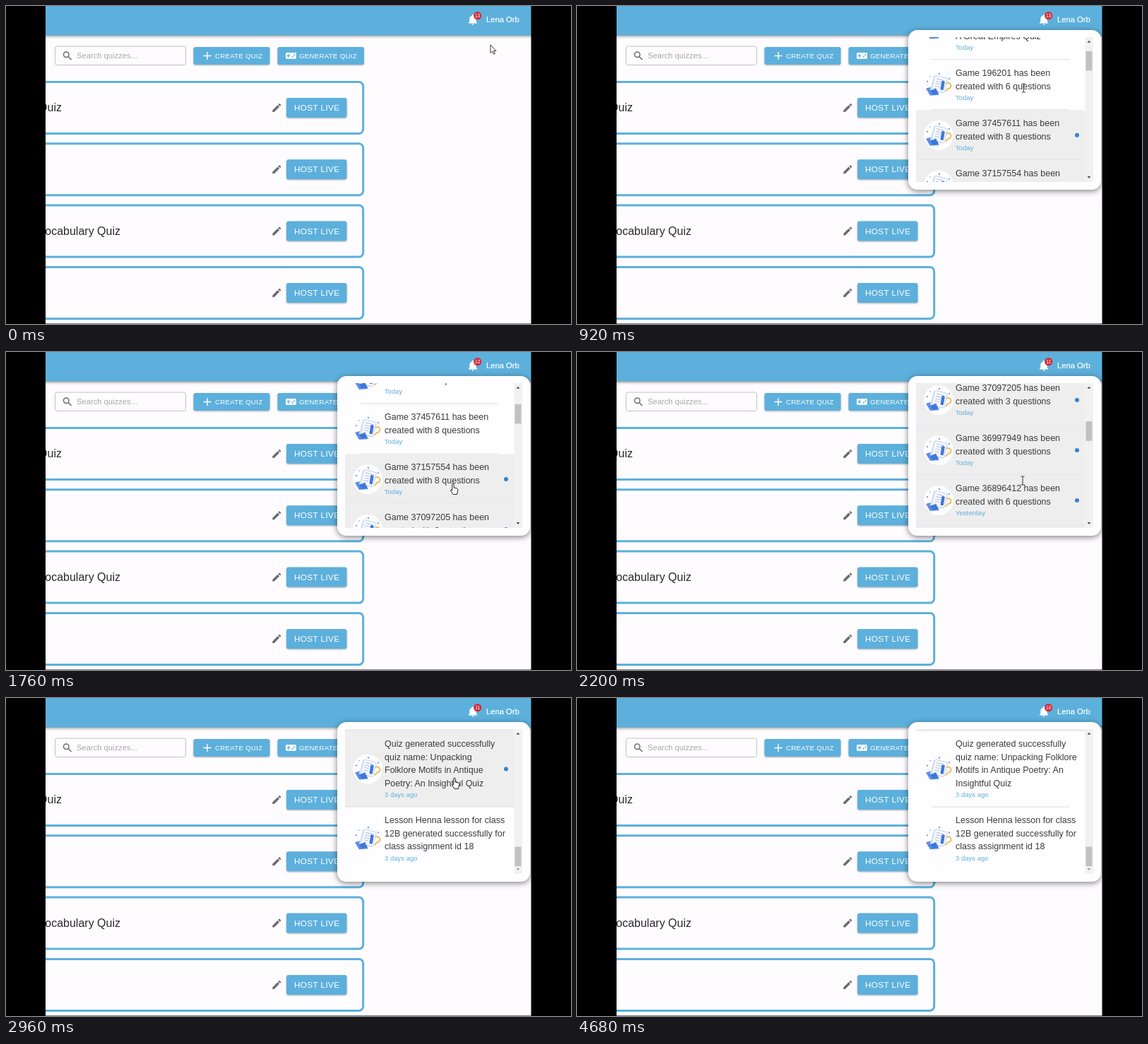
Animation, 800 px wide and 450 px high, one loop 4.72 s. Source, as an HTML page:

```html
<!DOCTYPE html>
<html lang="en">
<head>
<meta charset="utf-8">
<title>Quiz notifications</title>
<style>
html, body { margin: 0; width: 100%; height: 100%; overflow: hidden; background: #000; }
svg { display: block; width: 800px; height: 450px; font-family: "Liberation Sans", Arial, sans-serif; }
.btn { fill: #5db0dc; filter: drop-shadow(0 1px 1px rgba(0,0,0,.3)); }
.caps { fill: #fff; letter-spacing: .0286em; }
.line { fill: none; stroke-linecap: butt; }
.body { font-size: 12.5px; fill: #3b3a3c; }
.date { font-size: 9.5px; fill: #5fb0d8; }
</style>
</head>
<body>
<svg id="stage" viewBox="0 0 800 450">
  <defs>
    <clipPath id="view"><rect x="480" y="44" width="251" height="205"/></clipPath>
    <g id="pencil" fill="#6d6b6e">
      <path d="M-6 3.500V6h2.500L3.800-1.300 1.300-3.800zM5.800-3.300q.5-.5 0-1L4.300-5.800q-.5-.5-1 0L2.100-4.600 4.600-2.100z"/>
    </g>
    <g id="avatar">
      <circle r="21" fill="#fefdff"/>
      <path d="M-18 5L-8 2 1 14-12 15z" fill="#5a8fe6"/>
      <g transform="rotate(14)">
        <rect x="-10" y="-11" width="18" height="21" rx="1" fill="#dfe7f6"/>
        <rect x="-8" y="-12" width="18" height="21" rx="1" fill="#f8faff" stroke="#bccae6" stroke-width=".8"/>
        <path d="M-5-8H6M-5-4.500H5M-5-1H2M-5 2.500H2M-5 6H0" class="line" stroke="#aebedd"/>
      </g>
      <path d="M-12 8L-4 5 0 12-8 14z" fill="#3f76da"/>
      <rect x="3.500" y="-6" width="4.500" height="13" rx="1.500" fill="#3f78dc" transform="rotate(10 5 0)"/>
      <path d="M11-2a4 4 0 1 1 2 7l-3 4" class="line" stroke="#efbd62" stroke-width="2"/>
      <g fill="#4c83df">
        <circle cx="-16" cy="-5" r="1"/><circle cx="1" cy="-16" r="1.100"/>
        <circle cx="15" cy="-9" r="1"/><circle cx="-12" cy="-12" r=".7"/>
      </g>
    </g>
  </defs>

  <rect width="800" height="449.500" fill="#fefcff"/>
  <g id="cards"></g>

  <rect x="40" y="-10" width="720" height="51.500" fill="#5db0dc" style="filter:drop-shadow(0 1px 2px rgba(0,0,0,.5))"/>
  <circle id="ripple" cx="661" cy="20" r="11" fill="#fff" opacity="0"/>
  <path d="M655 24.500V23.500L656.300 22V18.500Q656.300 14.700 659.700 13.800V13.300a1.300 1.300 0 0 1 2.600 0V13.800Q665.700 14.700 665.700 18.500V22L667 23.500V24.500zM659.600 25.300h2.800a1.400 1.400 0 0 1-2.800 0z" fill="#fff"/>
  <circle cx="667.700" cy="13.700" r="5.600" fill="#cf2f3c"/>
  <text id="badge" x="667.700" y="16.100" font-size="6.600" text-anchor="middle" fill="#fff">13</text>
  <text x="680" y="23.200" font-size="11.200" fill="#fff" stroke="#fff" stroke-width=".2">Lena Orb</text>

  <rect x="69.500" y="57" width="185" height="26.500" rx="3" fill="none" stroke="#c2c0c4"/>
  <g class="line" stroke="#6d6b6e" stroke-width="1.500">
    <circle cx="85.300" cy="68.700" r="3.800"/><path d="M88 71.400L92.500 76"/>
  </g>
  <text x="100" y="74.300" font-size="11.200" fill="#a9a7ab">Search quizzes...</text>

  <rect class="btn" x="265.500" y="58" width="108" height="25" rx="3"/>
  <path d="M279.500 70.500H290.500M285 65V76" class="line" stroke="#fff" stroke-width="1.400"/>
  <text class="caps" x="296" y="73.700" font-size="9.700">CREATE QUIZ</text>
  <rect class="btn" x="384.500" y="58" width="122.500" height="25" rx="3"/>
  <rect x="396" y="66" width="15" height="8.800" rx="1.400" fill="#fff"/>
  <path d="M397.500 70.400H402.500M400 67.900V72.900" class="line" stroke="#5db0dc" stroke-width="1.300"/>
  <g fill="#5db0dc"><circle cx="405.800" cy="71.700" r="1.100"/><circle cx="408.400" cy="69.300" r="1.100"/></g>
  <text class="caps" x="415" y="73.700" font-size="9.700">GENERATE QUIZ</text>

  <g id="panel">
    <rect x="469" y="34" width="273" height="226" rx="13" fill="#fefdff" style="filter:drop-shadow(0 2px 4px rgba(0,0,0,.5))"/>
    <g clip-path="url(#view)">
      <g id="list"></g>
      <rect x="719.500" y="44" width="11.500" height="205" fill="#f2f1f2"/>
      <rect id="thumb" x="720.500" y="55.500" width="9" height="27.500" fill="#c2c1c2"/>
      <path id="up" d="M722.500 51.800h5l-2.500-3z"/>
      <path id="down" d="M722.500 241h5l-2.500 3z"/>
    </g>
  </g>

  <g id="cursor" stroke-linejoin="round">
    <path id="arrow" d="M0 0V11.500L2.700 9.200 4.600 13.200 6.300 12.400 4.500 8.500H8z" fill="#fff" stroke="#222" stroke-width=".9"/>
    <path id="hand" d="M-1.200 1.200a1.200 1.200 0 0 1 2.400 0V6L5.500 7Q7 7.500 6.800 9.500L5.500 15.500H0L-3.500 10Q-3.200 8-1.200 9.700z" fill="#fff" stroke="#222"/>
    <path id="beam" d="M-2.500-6H-.7Q0-6 0-5.300V5.300Q0 6-.7 6H-2.500M2.500-6H.7Q0-6 0-5.300M0 5.300Q0 6 .7 6H2.500" fill="none" stroke="#333"/>
  </g>

  <rect width="56" height="450"/>
  <rect x="743.500" width="57" height="450"/>
</svg>
<script>
(() => {
const LOOP = 4720, STEP = 40, MAX = 1158;
const $ = id => document.getElementById(id);

function add(parent, tag, attrs, text) {
  const el = document.createElementNS("http://www.w3.org/2000/svg", tag);
  for (const k in attrs) el.setAttribute(k, attrs[k]);
  if (text) el.textContent = text;
  parent.append(el);
  return el;
}

// Quiz cards
["Quiz", "", "Vocabulary Quiz", ""].forEach((title, i) => {
  const g = add($("cards"), "g", { transform: `translate(0 ${i * 87.3})` });
  add(g, "rect", { x: 20, y: 107.5, width: 485.7, height: 73, rx: 6, fill: "none", stroke: "#5db0dc", "stroke-width": 3 });
  if (title) add(g, "text", { x: i ? 162 : 79, y: 149.3, "font-size": 16, "text-anchor": "end", fill: "#29282a" }, title);
  add(g, "use", { href: "#pencil", x: 383.3, y: 144 });
  add(g, "rect", { class: "btn", x: 397, y: 130, width: 85.5, height: 28, rx: 3 });
  add(g, "text", { class: "caps", x: 408, y: 148, "font-size": 11.8 }, "HOST LIVE");
});

// Notifications; readAt is the time an entry is clicked, 0 if already read
const game = (id, n, date, readAt = Infinity) =>
  ({ lines: [`Game ${id} has been`, `created with ${n} questions`], date, readAt });
const made = "Quiz generated successfully";
const items = [
  { lines: [made, "quiz name: Bygone Milestones:", "A Great Empires Quiz"], date: "Today", readAt: 0 },
  game(196201, 6, "Today", 0),
  game(37457611, 8, "Today", 1480),
  game(37157554, 8, "Today", 1840),
  game(37097205, 3, "Today"),
  game(36997949, 3, "Today"),
  game(36896412, 6, "Yesterday")
];
for (let i = 0; i < 9; i++)
  items.push(game(36794038 - i * 93617, 3 + i * 5 % 6, i < 3 ? "Yesterday" : i < 6 ? "2 days ago" : "3 days ago"));
items.push({
  lines: [made, "quiz name: Unpacking", "Folklore Motifs in Antique", "Poetry: An Insightful Quiz"],
  readLines: [made, "quiz name: Unpacking Folklore", "Motifs in Antique Poetry: An", "Insightful Quiz"],
  date: "3 days ago", readAt: 3240
}, {
  lines: ["Lesson Henna lesson for class", "12B generated successfully for", "class assignment id 18"],
  date: "3 days ago", readAt: 0
});

let itemY = 50;
items.forEach((it, i) => {
  const h = 34 + 18.5 * it.lines.length;
  const g = add($("list"), "g", { transform: `translate(0 ${itemY})` });
  const last = i === items.length - 1;
  const face = (lines, unread) => {
    const f = add(g, "g", {});
    if (unread) add(f, "rect", { x: 480, width: 239.5, height: h, fill: "#efeeef" });
    if (!last) add(f, "rect", unread
      ? { x: 480, y: h - 1, width: 239.5, height: 1, fill: "#e5e3e5" }
      : { x: 502, y: h - 1, width: 195, height: 1, fill: "#dedcdf" });
    add(f, "use", { href: "#avatar", x: 512, y: h / 2 });
    lines.forEach((s, k) => add(f, "text", { class: "body", x: 536, y: 22.8 + 18.5 * k }, s));
    add(f, "text", { class: "date", x: 536, y: h - 14.2 }, it.date);
    if (unread) add(f, "circle", { cx: 708, cy: h / 2, r: 3, fill: "#3b80cf" });
    return f;
  };
  it.fresh = face(it.lines, true);
  it.seen = face(it.readLines || it.lines, false);
  itemY += h;
});

// Tables: time, then values
const scrollKeys = [[0, 0], [760, 0], [1160, 179.5], [1280, 179.5], [1420, 137], [1880, 137], [2160, 320], [2260, 320], [2780, MAX]];
const panelKeys = [[520, .75, .56, 0], [560, .85, .75, .2], [600, .95, .93, .55], [640, .986, .986, .83], [680, 1, 1, .96], [720, 1, 1, 1]];
const rippleKeys = [[440, 0], [520, .3], [640, .2], [760, 0]];
const moveKeys = [[0, 686, 55], [80, 685, 52], [360, 663, 23], [520, 661, 20], [640, 641, 72], [840, 633, 112], [1160, 630, 128],
  [1280, 630, 128], [1440, 630, 108], [1520, 630, 108], [1760, 633, 186], [1880, 633, 186], [2080, 631, 182],
  [2400, 631, 182], [2800, 634, 125], [2960, 635, 113], [3320, 635, 113], [3400, 635, 120], [3480, 571, 120], [3520, 470, 200]];
const shapes = [[0, "arrow"], [320, "hand"], [560, "arrow"], [600, "beam"], [1000, "hand"], [2080, "beam"], [2880, "hand"], [3360, "beam"], [3520, ""]];

function at(keys, t, ease = p => p) {
  if (t <= keys[0][0]) return keys[0].slice(1);
  const i = keys.findIndex(k => k[0] > t);
  if (i < 0) return keys[keys.length - 1].slice(1);
  const a = keys[i - 1], b = keys[i], p = ease((t - a[0]) / (b[0] - a[0]));
  return a.slice(1).map((v, j) => v + (b[j + 1] - v) * p);
}
const smooth = p => p * p * (3 - 2 * p);
const show = (el, on) => el.setAttribute("display", on ? "inline" : "none");

function draw(t) {
  const [s] = at(scrollKeys, t, smooth);
  $("list").setAttribute("transform", `translate(0 ${-s})`);
  $("thumb").setAttribute("y", 55.5 + 155 * s / MAX);
  $("up").setAttribute("fill", s > 0 ? "#505050" : "#a5a4a5");
  $("down").setAttribute("fill", s < MAX ? "#505050" : "#a5a4a5");

  const [sx, sy, alpha] = at(panelKeys, t);
  $("panel").setAttribute("transform", `translate(605.5 34) scale(${sx} ${sy}) translate(-605.5 -34)`);
  $("panel").setAttribute("opacity", alpha);
  $("ripple").setAttribute("opacity", at(rippleKeys, t)[0]);

  let unread = 13;
  for (const it of items) {
    const seen = t >= it.readAt;
    show(it.fresh, !seen);
    show(it.seen, seen);
    if (seen && it.readAt) unread--;
  }
  $("badge").textContent = unread;

  const [x, y] = at(moveKeys, t);
  $("cursor").setAttribute("transform", `translate(${x} ${y})`);
  const shape = shapes.filter(k => k[0] <= t).pop()[1];
  for (const id of ["arrow", "hand", "beam"]) show($(id), id === shape);
}

const start = performance.now();
function tick() {
  const t = (performance.now() - start) % LOOP;
  draw(Math.floor(t / STEP) * STEP);
  requestAnimationFrame(tick);
}
tick();
})();
</script>
</body>
</html>
```
